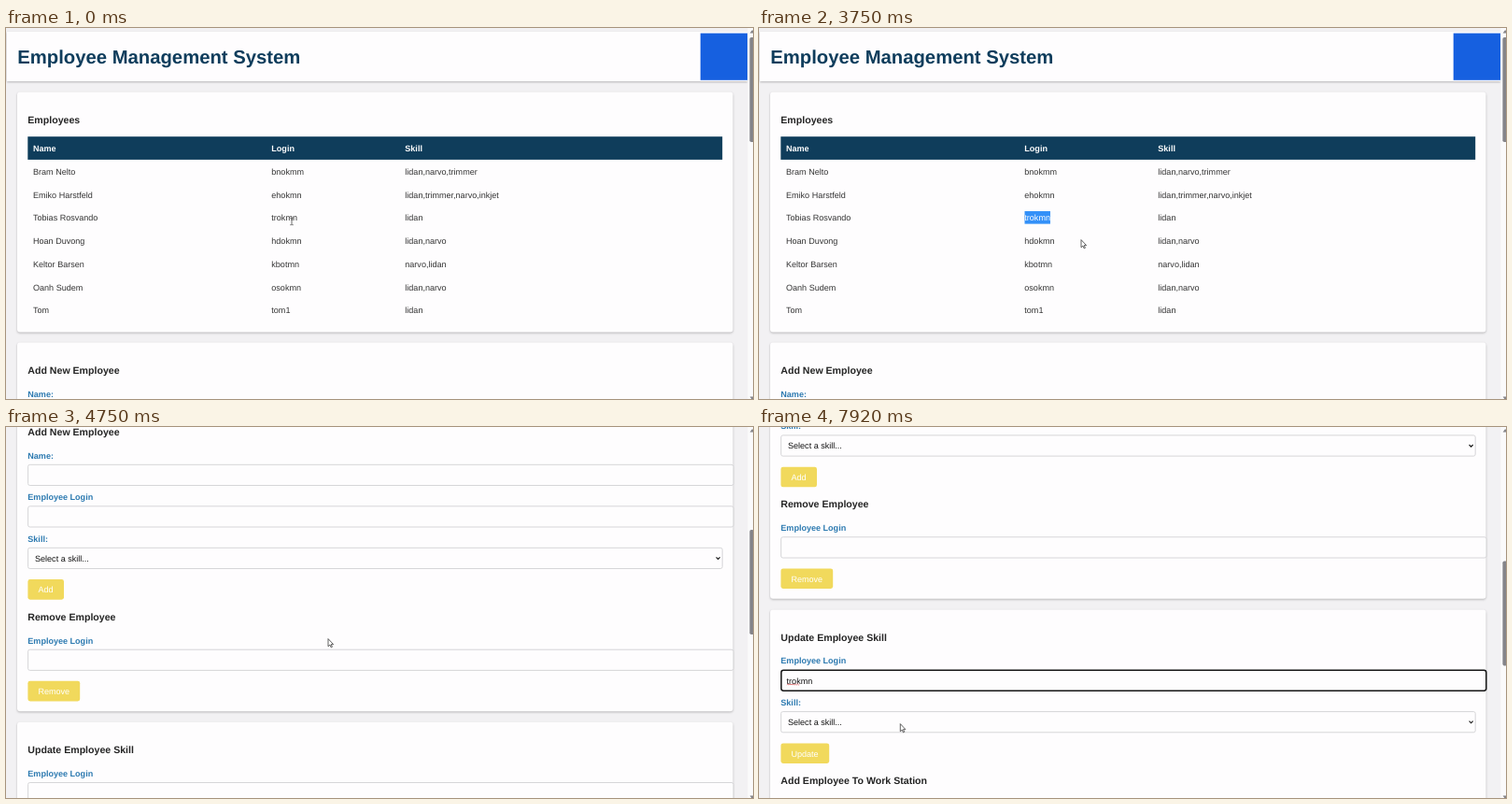
An HTML page that plays this animation: 800x397 px, repeating every 8000 ms.

```html
<!DOCTYPE html>
<html lang="en">
<head>
<meta charset="utf-8">
<title>Employee Management System</title>
<style>
  html, body { margin: 0; width: 100%; height: 100%; overflow: hidden; background: #f2f1f3; }
  svg { display: block; width: 100%; height: 100%; }
  text { font-family: "Liberation Sans", Arial, sans-serif; font-size: 9.05px; fill: #333; text-rendering: geometricPrecision; }
  .title { font-size: 20.3px; font-weight: 700; fill: #0f3d5c; }
  .head { font-size: 10.6px; font-weight: 700; fill: #252525; }
  .label { font-weight: 700; fill: #2b79b0; }
  .th { font-weight: 700; fill: #fff; }
  .light { fill: #fff; }
  .dark { fill: #111; }
  .card { fill: #fefdfe; filter: drop-shadow(0 1px 1.3px rgba(0, 0, 0, .25)); }
  .field { fill: #fefdfe; stroke: #d2d2d4; stroke-width: .9; }
  .btn { fill: #f1d95c; }
</style>
</head>
<body>
<svg id="stage" viewBox="0 0 800 397" preserveAspectRatio="none"></svg>
<script>
const NS = 'http://www.w3.org/2000/svg';
const LOOP = 8000, FPS = 12;
const LOGIN = 'trokmn';
const stage = document.getElementById('stage');

function add(parent, tag, attrs, content) {
  const el = document.createElementNS(NS, tag);
  for (const k in attrs) el.setAttribute(k, attrs[k]);
  if (content) el.textContent = content;
  return parent.appendChild(el);
}
const rect = (p, x, y, width, height, attrs) => add(p, 'rect', { x, y, width, height, ...attrs });
// y is the middle of the capital letters
const text = (p, x, y, str, cls = '', size = 9.05) =>
  add(p, 'text', { x, y: y + size * 0.36, class: cls }, str);
const show = (el, on) => el.setAttribute('visibility', on ? 'visible' : 'hidden');

const page = add(stage, 'g', {});
const card = (y, h) => rect(page, 12, y, 766.5, h, { rx: 3, class: 'card' });
const heading = (y, str) => text(page, 23.3, y, str, 'head', 10.6);

function input(y, str) {
  text(page, 23.3, y, str, 'label');
  return rect(page, 23.6, y + 9.9, 755.4, 22.2, { rx: 2, class: 'field' });
}
function select(y) {
  text(page, 23.3, y, 'Skill:', 'label');
  rect(page, 23.6, y + 9.9, 743.6, 22.2, { rx: 2, class: 'field' });
  text(page, 31, y + 21.2, 'Select a skill...', 'dark');
  add(page, 'path', { d: `M760.6 ${y + 20} l2 2.1 l2 -2.1`, fill: 'none', stroke: '#111', 'stroke-width': 1.1 });
}
function button(y, w, str) {
  rect(page, 23.4, y, w, 21.6, { rx: 2.4, class: 'btn' });
  text(page, 34.4, y + 10.9, str, 'light');
}

// Top bar
rect(page, 1, 4, 793, 53, { class: 'card' });
text(page, 12.2, 30.3, 'Employee Management System', 'title', 20.3);
rect(page, 743.7, 5.6, 50.3, 50.2, { fill: '#1660e0' });

// Employee table
const COLS = [29, 284.3, 427.3];
const ROWS = [
  ['Bram Nelto', 'bnokmm', 'lidan,narvo,trimmer'],
  ['Emiko Harstfeld', 'ehokmn', 'lidan,trimmer,narvo,inkjet'],
  ['Tobias Rosvando', LOGIN, 'lidan'],
  ['Hoan Duvong', 'hdokmn', 'lidan,narvo'],
  ['Keltor Barsen', 'kbotmn', 'narvo,lidan'],
  ['Oanh Sudem', 'osokmn', 'lidan,narvo'],
  ['Tom', 'tom1', 'lidan']
];
card(68.6, 256.8);
heading(97.8, 'Employees');
rect(page, 23.3, 116.2, 743.9, 24.7, { fill: '#0f3d5b' });
['Name', 'Login', 'Skill'].forEach((s, i) => text(page, COLS[i], 128.7, s, 'th'));
ROWS.forEach((row, r) => row.forEach((s, i) => text(page, COLS[i], 153.6 + r * 24.73, s)));

// Text selection over one login
const clip = add(add(stage, 'defs', {}), 'clipPath', { id: 'sel' });
const clipBox = rect(clip, COLS[1], 196, 0, 13.8);
const picked = add(page, 'g', { 'clip-path': 'url(#sel)' });
rect(picked, COLS[1], 196, 40, 13.8, { fill: '#3390f8' });
const pickedText = text(picked, COLS[1], 203.06, LOGIN, 'light');

// Forms
card(336.6, 328.8);
heading(366.6, 'Add New Employee');
input(391.6, 'Name:');
input(436.1, 'Employee Login');
select(480.6);
button(524.3, 38.6, 'Add');
heading(563.9, 'Remove Employee');
input(589.5, 'Employee Login');
button(633, 55.8, 'Remove');

card(677, 400);
heading(706.7, 'Update Employee Skill');
const target = input(731.8, 'Employee Login');
select(776.3);
button(820, 51.8, 'Update');
heading(859.7, 'Add Employee To Work Station');

const focus = rect(page, 23.8, 741.9, 755, 21.9, { rx: 2.4, fill: 'none', stroke: '#151515', 'stroke-width': 1.5 });
const pasted = text(page, 29.6, 752.9, LOGIN, 'dark');
let wave = 'M29.8 757.6';
for (let i = 0; i < 13; i++) wave += ` l1.05 ${i % 2 ? 1 : -1}`;
const squiggle = add(page, 'path', { d: wave, fill: 'none', stroke: '#d8484a', 'stroke-width': 0.7 });
const caret = rect(page, 29.6, 747.6, 0.8, 10.6, { fill: '#111' });

// Scrollbar
rect(stage, 794.4, 0, 5.6, 397, { fill: '#fafafb' });
add(stage, 'path', { d: 'M796.6 5.4 h3.4 v-3 h-1.2z M796.6 394.4 h3.4 v2.6 h-1.6z', fill: '#85858a' });
const thumb = rect(stage, 796.4, 10, 4.6, 112, { rx: 1.8, fill: '#85858a' });

// Mouse pointers, both with their hot spot at 0,0
const arrow = add(stage, 'path', {
  d: 'M0 0 V8.2 L1.9 6.5 L3.2 9.3 L4.4 8.7 L3.2 6 H5.6 Z',
  fill: '#fff', stroke: '#3a3a3a', 'stroke-width': 0.8, 'stroke-linejoin': 'round'
});
const beam = add(stage, 'path', {
  d: 'M-1.7 -3.7 H-.5 L0 -3.2 L.5 -3.7 H1.7 M0 -3.2 V3.2 M-1.7 3.7 H-.5 L0 3.2 L.5 3.7 H1.7',
  fill: 'none', stroke: '#444', 'stroke-width': 0.8
});

const PATH = [
  [0, 306, 207], [300, 306, 207], [900, 284, 203], [1100, 284, 203],
  [1583, 310, 203.4], [1800, 314, 203], [2200, 319.3, 199], [2950, 319.3, 199],
  [3500, 345, 226.6], [5080, 345, 226.6], [5800, 228.3, 271], [7050, 228.3, 271],
  [7560, 156, 313], [7850, 151.3, 317.6], [LOOP, 151.3, 317.6]
];
const NOTCHES = [3750, 4053, 4420, 4752];
const NOTCH = 120.4, NOTCH_MS = 245;
const DRAG = 1100, RELEASE = 2000, FOCUS = 6330, PASTE = 6990;

const clamp = v => Math.max(0, Math.min(1, v));
const ease = u => u * u * (3 - 2 * u);

function pointer(t) {
  const i = Math.max(1, PATH.findIndex(p => p[0] > t));
  const [t0, x0, y0] = PATH[i - 1], [t1, x1, y1] = PATH[i];
  const u = ease(clamp((t - t0) / (t1 - t0)));
  return [x0 + (x1 - x0) * u, y0 + (y1 - y0) * u];
}

function selectedWidth(t, x) {
  if (t < DRAG) return 0;
  let w = 0;
  for (let n = 1; n <= LOGIN.length; n++) {
    const end = pickedText.getSubStringLength(0, n);
    if (COLS[1] + end <= x || t > RELEASE) w = end;
  }
  return w;
}

function draw(t) {
  const scroll = NOTCHES.reduce((s, n) => s + NOTCH * ease(clamp((t - n) / NOTCH_MS)), 0);
  const [x, y] = pointer(t);
  page.setAttribute('transform', `translate(0 ${-scroll})`);
  thumb.setAttribute('y', 10 + scroll * 0.277);
  clipBox.setAttribute('width', selectedWidth(t, x));

  const overText = t < RELEASE || (t > 5100 && y > 260 && y < 283);
  for (const el of [arrow, beam]) el.setAttribute('transform', `translate(${x} ${y})`);
  show(arrow, !overText);
  show(beam, overText);

  const typed = t >= PASTE;
  show(focus, t >= FOCUS);
  show(target, t < FOCUS);
  show(pasted, typed);
  show(squiggle, t >= PASTE + 250);
  show(caret, t >= FOCUS && (t - (typed ? PASTE : FOCUS)) % 1000 < 500);
  caret.setAttribute('x', 29.6 + (typed ? pasted.getComputedTextLength() : 0));
}

const start = performance.now();
function tick(now) {
  const t = Math.max(0, now - start) % LOOP;
  draw(Math.floor((t + 5) * FPS / 1000) * 1000 / FPS);
  requestAnimationFrame(tick);
}
draw(0);
requestAnimationFrame(tick);
</script>
</body>
</html>
```
